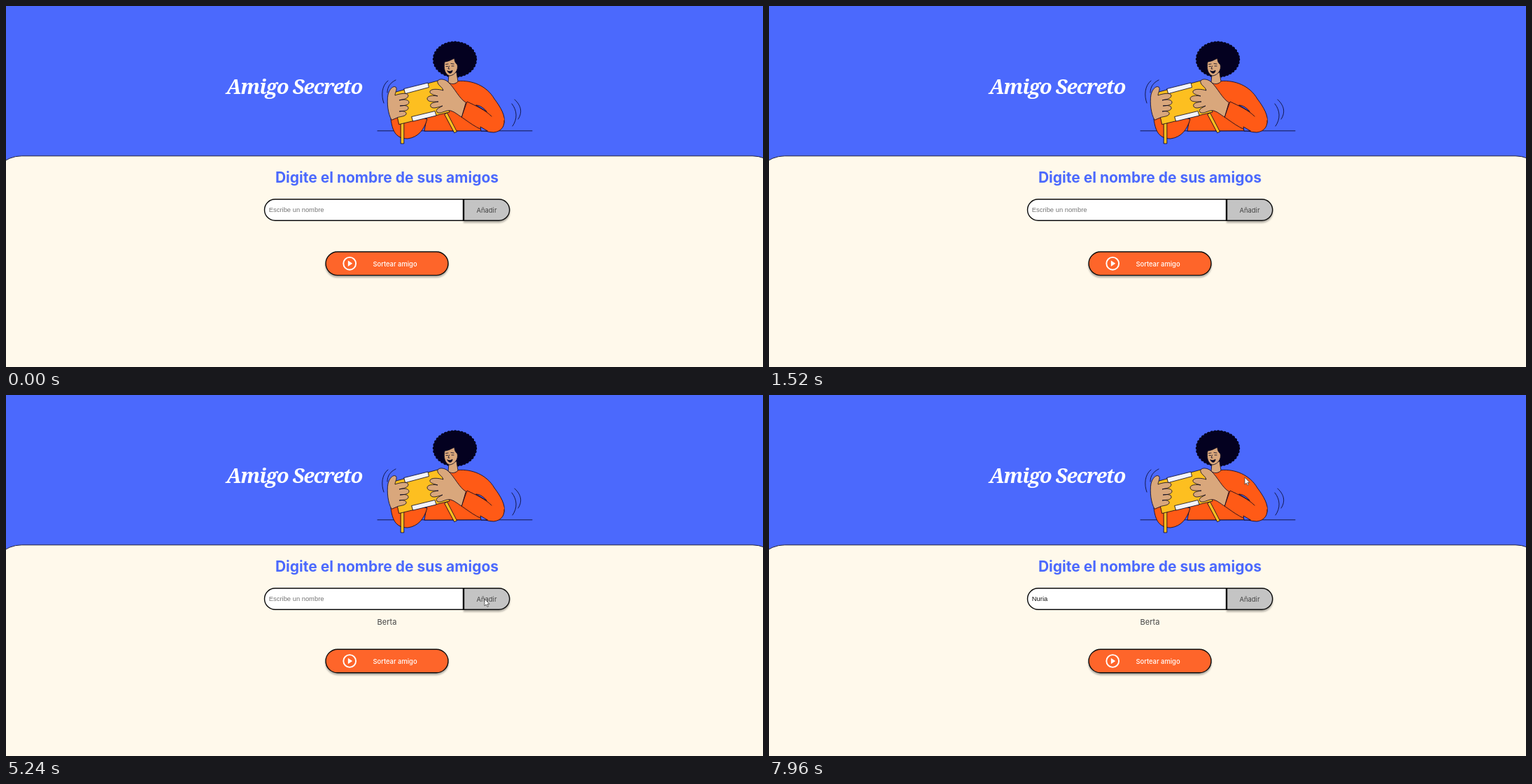
An HTML page for the animation above (8000 ms loop, 1082 by 517 pixels).

```html
<!DOCTYPE html>
<html lang="es">
<head>
<meta charset="utf-8">
<title>Amigo Secreto</title>
<style>
  html, body { margin: 0; width: 100%; height: 100%; overflow: hidden; background: #fff9eb; }
  svg { display: block; width: 100vw; height: 100vh; }
  text { font-family: Inter, sans-serif; font-optical-sizing: none; }
  .mid { text-anchor: middle; }
  .title { font: italic 700 29px "Noto Serif", serif; letter-spacing: -1.3px; fill: #fff; }
  .heading { font-size: 21px; font-weight: 700; fill: #4b69fd; }
  .btn { font-size: 9.4px; }
  .item { font-size: 11px; fill: #444; }
  .field { font-family: "Liberation Sans", Arial, sans-serif; font-size: 9.4px; }
  .box { stroke: #0b0b0b; stroke-width: 1.4; }
  .art { stroke: #06051f; stroke-width: .8; stroke-linejoin: round; stroke-linecap: round; }
  .skin { fill: #d9a77c; }
  .cloth { fill: #ff5a16; }
  .wood { fill: #fdbf20; }
  .label { fill: #f4f4fa; }
  .line { fill: none; }
</style>
</head>
<body>
<svg viewBox="0 0 1082 517" preserveAspectRatio="none">
  <defs>
    <filter id="drop" x="-10%" y="-20%" width="120%" height="160%">
      <feDropShadow dx="0" dy="2.6" stdDeviation="1.3" flood-color="#000" flood-opacity=".3"/>
    </filter>
  </defs>

  <rect width="1082" height="517" fill="#4b69fd"/>
  <rect x="-22.6" y="214.8" width="1134.6" height="400" rx="45" fill="#fff9eb" stroke="#10102c" stroke-width=".9"/>

  <text class="title mid" x="412" y="125.5">Amigo Secreto</text>

  <g class="art">
    <path class="line" d="M531 178.8H752"/>
    <path class="line" d="M546 107C537 114 536 128 540 139M557 106C549 110 545 116 545 124"/>
    <path class="line" d="M727 134C737 143 738 153 732 162M723 140C731 150 731 162 724 172"/>

    <ellipse cx="641.5" cy="76.5" rx="29" ry="23.5" fill="#040120"/>
    <ellipse cx="641.5" cy="76.5" rx="29" ry="23.5" fill="none" stroke="#040120" stroke-width="5.4" stroke-dasharray="0 4.6"/>

    <path class="cloth" d="M598 178.8L603 150L618 113C625 112 630 110 632 108C637 112 643 111 646 107.500C666 106 687 114 698 133C707 145 714 157 712 167C708 180 697 182 690 178.800Z"/>
    <path class="skin" d="M633 98L632 109C636 113 643 112 646 108L644 95Z"/>
    <path class="skin" d="M627 80C632 80 638 76 641 75C641 80 643 82 645 84C647 91 642 99 634 100C627 98 625 88 627 80Z"/>
    <path class="line" d="M628.500 83.500L632 83M636 82.500L640 83M629 86.500H631.500M637 86H640M633.500 86L632 90H634"/>
    <path fill="#06051f" d="M631 93C633 94 636 94 638 92C638 97 633 98 631 93Z"/>

    <path class="cloth" d="M550 162C552 177 556 190 574 190C590 188 598 176 602 162L578 156Z"/>
    <path class="wood" d="M627 155L630.500 153L644.500 180L641 181.500Z"/>
    <path class="wood" d="M564.500 167H568.800V197H564.500Z"/>
    <path class="wood" d="M552 124.500L621 106L634 152L562 169.500Z"/>
    <path class="label" d="M569 118.500L603 110L604.500 116.500L571 125.500Z"/>
    <path class="label" d="M580 158.500L613 150.500L615 157L582 165Z"/>

    <path class="skin" d="M551 163C546 155 544 138 546 127C548 119 553 114 557 116C560 119 556 124 556 128C561 126 574 123 575 128C575 133 567 134 562 135C568 133 576 134 576 138C576 142 568 143 563 143C568 142 576 142 575 147C573 151 567 150 562 151C567 150 573 151 572 155C569 159 562 158 559 160Z"/>

    <path class="cloth" d="M659 137L651 159C664 168 680 181 697 181C708 181 714 171 712 161C705 155 700 158 694 158C685 148 672 143 659 137Z" stroke="none"/>
    <path class="line" d="M694 158C685 149 672 143 659 137L651 159C664 168 680 181 697 181C707 180 713 173 712 164"/>
    <path fill="#4b69fd" d="M672 142C677 142 683 146 687 151Z"/>
    <path fill="#4b69fd" d="M679 178.800L678 173L688 178.800Z"/>
    <path class="skin" d="M657 138C648 133 641 117 632 109C626 103 615 104 617 110C618 114 624 116 625 121C619 119 608 118 606 122C605 126 611 127 617 129C611 128 602 128 602 133C603 138 611 137 618 137C612 138 605 139 607 144C610 148 617 145 624 143C619 146 613 148 616 152C621 156 628 148 636 150C642 152 646 156 651 159Z"/>
  </g>

  <text class="heading mid" x="544.5" y="253">Digite el nombre de sus amigos</text>

  <path class="box" fill="#c4c4c4" filter="url(#drop)" d="M654.500 276.800H704.500A15.200 15.200 0 0 1 704.500 307.200H654.500Z"/>
  <path class="box" fill="#fff" d="M653.500 276.800H384.700A15.200 15.200 0 0 0 384.700 307.200H653.500Z"/>
  <text class="btn mid" x="687" y="295.500" fill="#444">Añadir</text>
  <text class="field" id="field" x="375.800" y="295"></text>
  <rect id="caret" y="286.600" width=".9" height="10.600" fill="#111"/>

  <text class="item mid" id="item" x="544.5" y="329.300"></text>

  <g id="draw">
    <rect class="box" x="457" y="352" width="175" height="33.600" rx="16.800" fill="#fe652b" filter="url(#drop)"/>
    <circle cx="491.200" cy="368.800" r="8.900" fill="none" stroke="#fff" stroke-width="1.900"/>
    <path d="M488.800 364.600V373L495.200 368.800Z" fill="#fff"/>
    <text class="btn mid" x="556" y="372.500" fill="#fff" font-weight="500">Sortear amigo</text>
  </g>

  <path id="pointer" d="M0 0V10L2.300 8L4 11.400L5.500 10.700L3.900 7.400H7Z" fill="#fff" stroke="#333" stroke-width=".7" stroke-linejoin="round"/>
</svg>

<script>
const LOOP = 8000, ADDED = 5200, HINT = 'Escribe un nombre';
const $ = id => document.getElementById(id);
const field = $('field'), caret = $('caret'), item = $('item'), draw = $('draw'), pointer = $('pointer');

const words = [
  { text: 'Berta', keys: [3020, 3100, 3180, 3260, 3420], until: ADDED },
  { text: 'Nuria', keys: [7060, 7160, 7260, 7360, 7440], until: LOOP }
];

// Spans [from, to) in which the text caret is lit
const lit = [[940, 1460], [1980, 2500], [3020, 3920], [5600, 6120], [6660, 7940]];

// Pointer routes: [time, x, y]
const routes = [
  [[3660, 640, 276], [3960, 672, 30], [4060, 672, 30], [4340, 647, 230], [4560, 684, 292], [5300, 684, 292], [5500, 640, 284]],
  [[7800, 600, 276], [7960, 680, 118], [8000, 682, 112]]
];

const ease = p => p * p * (3 - 2 * p);

function typed(t) {
  const w = words.find(w => t >= w.keys[0] && t < w.until);
  return w ? w.text.slice(0, w.keys.filter(k => k <= t).length) : '';
}

function pointerAt(t) {
  const r = routes.find(r => t >= r[0][0] && t < r[r.length - 1][0]);
  if (!r) return null;
  const i = r.findIndex(k => k[0] > t), a = r[i - 1], b = r[i];
  const p = ease((t - a[0]) / (b[0] - a[0]));
  return [a[1] + (b[1] - a[1]) * p, a[2] + (b[2] - a[2]) * p];
}

function render(t) {
  const text = typed(t), added = t >= ADDED;
  field.textContent = text || HINT;
  field.setAttribute('fill', text ? '#111' : '#757575');
  caret.setAttribute('x', 375.8 + (text ? field.getComputedTextLength() : 0));
  caret.style.display = lit.some(([a, b]) => t >= a && t < b) ? '' : 'none';

  item.textContent = added ? words[0].text : '';
  draw.setAttribute('transform', `translate(0 ${added ? 12.2 : 0})`);

  const at = pointerAt(t);
  pointer.style.display = at ? '' : 'none';
  if (at) pointer.setAttribute('transform', `translate(${at[0]} ${at[1]})`);
}

const start = performance.now();
function tick() {
  render((performance.now() - start) % LOOP);
  requestAnimationFrame(tick);
}
tick();
</script>
</body>
</html>
```
